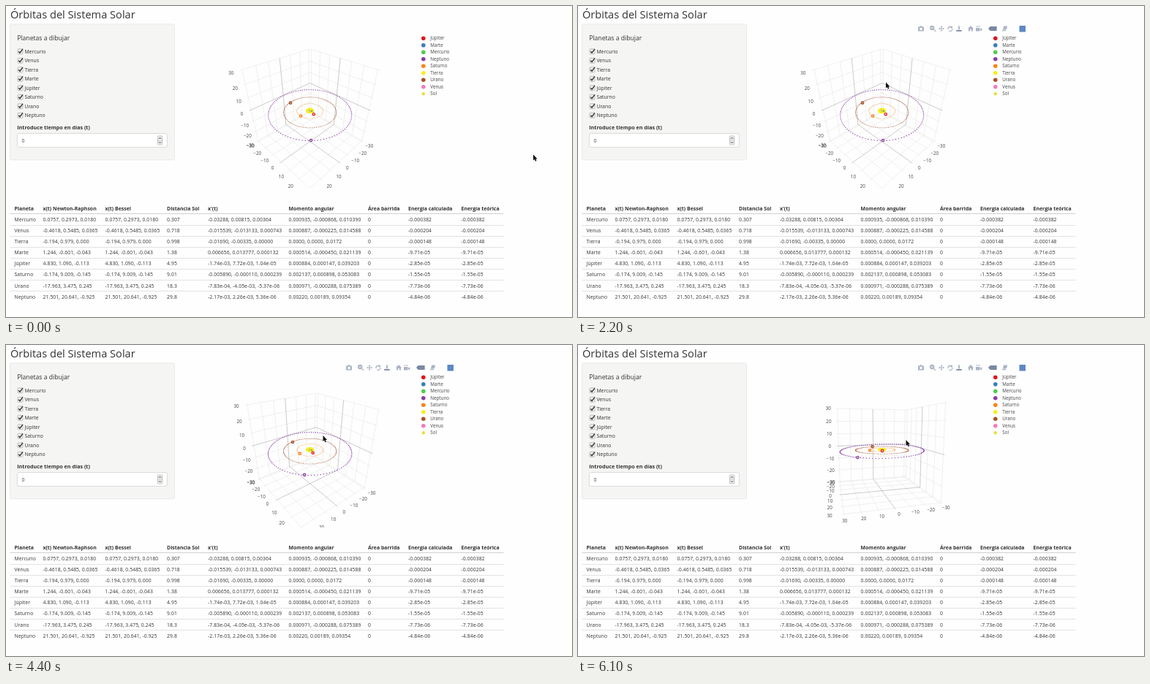
Animation of 774 by 426 pixels, one loop 6.2 s. Source, as an HTML page with a canvas:

```html
<!DOCTYPE html>
<html lang="es">
<head>
<meta charset="utf-8">
<title>Órbitas del Sistema Solar</title>
<style>
html, body { margin: 0; width: 100%; height: 100%; overflow: hidden; background: #fff; }
canvas { display: block; }
</style>
</head>
<body>
<canvas id="stage" width="774" height="426"></canvas>
<script>
const ctx = document.getElementById('stage').getContext('2d');
const LOOP = 6200, STEP = 100;
const FONT = '"Open Sans", sans-serif';
const colors = {
  'Júpiter': '#e0141c', Marte: '#377eb8', Mercurio: '#50cc4c', Neptuno: '#8a3ca5', Saturno: '#f98412',
  Tierra: '#f8ee1c', Urano: '#a6522a', Venus: '#f27bbd', Sol: '#ecdc46'
};
const planets = ['Mercurio', 'Venus', 'Tierra', 'Marte', 'Júpiter', 'Saturno', 'Urano', 'Neptuno'];
const columns = [11.5, 50.5, 135.5, 220, 276, 386.5, 495, 550, 622.5];
const heads = ['Planeta', 'x(t) Newton-Raphson', 'x(t) Bessel', 'Distancia Sol', "x'(t)", 'Momento angular',
  'Área barrida', 'Energía calculada', 'Energía teórica'];
// position | distance | velocity | angular momentum | energy
const rows = `0.0757, 0.2973, 0.0180|0.307|-0.03288, 0.00815, 0.00364|0.000935, -0.000868, 0.010390|-0.000382
-0.4618, 0.5485, 0.0365|0.718|-0.015539, -0.013133, 0.000743|0.000887, -0.000225, 0.014588|-0.000204
-0.194, 0.979, 0.000|0.998|-0.01690, -0.00335, 0.00000|0.0000, 0.0000, 0.0172|-0.000148
1.244, -0.601, -0.043|1.38|0.006656, 0.013777, 0.000132|0.000514, -0.000450, 0.021139|-9.71e-05
4.830, 1.090, -0.113|4.95|-1.74e-03, 7.72e-03, 1.04e-05|0.000884, 0.000147, 0.039203|-2.85e-05
-0.174, 9.009, -0.145|9.01|-0.005890, -0.000110, 0.000239|0.002137, 0.000898, 0.053083|-1.55e-05
-17.963, 3.475, 0.245|18.3|-7.83e-04, -4.05e-03, -5.37e-06|0.000971, -0.000288, 0.075389|-7.73e-06
21.501, 20.641, -0.925|29.8|-2.17e-03, 2.26e-03, 5.36e-06|0.00220, 0.00189, 0.09354|-4.84e-06`
  .split('\n').map(line => line.split('|'));

// Keyframes: time, then values
const cursorKeys = [[0, 721, 203.5], [350, 721, 203.5], [800, 536, 175.5], [1300, 470, 138], [1800, 421, 104.5],
  [2400, 421, 104.5], [2900, 443, 130], [3300, 443.5, 130], [4000, 441.5, 132], [4200, 441.5, 132],
  [4900, 413.5, 104], [5300, 409, 100], [5500, 409, 100], [6000, 448.5, 130]];
const cameraKeys = [[0, 45, 35.26], [4200, 45, 35.26], [4900, 71.3, 11.8], [5300, 75.3, 8]];

function at(keys, t) {
  const i = keys.findIndex(k => k[0] > t);
  if (i < 0) return keys[keys.length - 1].slice(1);
  const a = keys[i - 1], b = keys[i], u = (t - a[0]) / (b[0] - a[0]);
  return a.slice(1).map((v, j) => v + (b[j + 1] - v) * u);
}

function text(s, x, y, size, { color = '#333', weight = 400, align = 'left', spacing = 0 } = {}) {
  ctx.font = `${weight} ${size}px ${FONT}`;
  ctx.letterSpacing = spacing + 'px';
  ctx.fillStyle = color;
  ctx.textAlign = align;
  ctx.fillText(s, x, y);
}
function box(x, y, w, h, fill, stroke, r = 2) {
  ctx.beginPath();
  ctx.roundRect(x, y, w, h, r);
  ctx.fillStyle = fill;
  ctx.fill();
  if (stroke) { ctx.strokeStyle = stroke; ctx.lineWidth = .7; ctx.stroke(); }
}
function dot(x, y, r, fill, stroke) {
  ctx.beginPath();
  ctx.arc(x, y, r, 0, 7);
  ctx.fillStyle = fill;
  ctx.fill();
  if (stroke) { ctx.strokeStyle = stroke; ctx.lineWidth = 1.2; ctx.stroke(); }
}
function line(points, color, width = .6) {
  ctx.beginPath();
  points.forEach(p => ctx.lineTo(...p));
  ctx.strokeStyle = color;
  ctx.lineWidth = width;
  ctx.stroke();
}
const rule = (y, color) => line([[5.5, Math.floor(y) + .5], [680.5, Math.floor(y) + .5]], color, 1);

function drawPanel() {
  text('Órbitas del Sistema Solar', 6, 17, 14.6);
  box(5.5, 24.8, 225, 186, '#f5f5f4', '#e3e3e3');
  text('Planetas a dibujar', 15.2, 47.3, 8.65);
  planets.forEach((name, i) => {
    const y = 62.2 + i * 12.5;
    box(16, y - 3.4, 7, 7, '#eee', '#aaa', 1.2);
    line([[17.2, y], [19, y + 2], [23, y - 3.4]], '#333', 1.4);
    text(name, 25.4, y + 2.4, 6.9);
  });
  text('Introduce tiempo en días (t)', 15.2, 169.3, 7.2, { weight: 700 });
  box(15.4, 174.6, 205, 18.8, '#fff', '#ccc');
  text('0', 21.5, 186.6, 6.9, { color: '#444' });
  box(207.5, 178, 6.3, 12, '#f3f3f3', '#aaa', 1);
  line([[207.5, 184], [213.8, 184]], '#aaa');
  for (const d of [-1, 1]) line([[209, 184 + d * 2], [210.6, 184 + d * 4], [212.2, 184 + d * 2]], '#444', .9);
}

function drawTable() {
  heads.forEach((h, i) => text(h, columns[i], 279.7, 6.95, { weight: 700 }));
  rule(284, '#d0d0d0');
  rows.forEach(([pos, dist, vel, mom, energy], r) => {
    const y = 295.2 + r * 15.05;
    [planets[r], pos, pos, dist, vel, mom, '0', energy, energy].forEach((s, i) =>
      text(s, columns[i], y, 6.8, { spacing: .1 }));
    if (r < 7) rule(y + 5, '#e2e2e2');
  });
}

function drawLegend() {
  Object.keys(colors).forEach((name, i) => {
    const y = 44.2 + i * 9.5;
    dot(570.8, y, name === 'Sol' ? 2.2 : 2.8, colors[name]);
    text(name, 580.3, y + 2.2, 6.25, { color: '#444' });
  });
}

// Icons are centred on 0,0: x, path, strong
const icons = [
  [469, 'M-4-2.5h2l1-1.3h2l1 1.3h2v6h-8zM-1.8.4a1.8 1.8 0 1 0 3.6 0a1.8 1.8 0 1 0-3.6 0z'],
  [485, 'M-4-1a3.2 3.2 0 1 0 6.4 0a3.2 3.2 0 1 0-6.4 0zM-2.4-1.4h3.2v.9h-3.2zM1.3 2l1-1 2.2 2.2-1 1z'],
  [497, 'M0-4l1.6 1.8H.5v1.7h1.7v-1.1L4 0 2.2 1.6V.5H.5v1.7h1.1L0 4l-1.6-1.8h1.1V.5h-1.7v1.1L-4 0l1.8-1.6v1.1h1.7v-1.7h-1.1z'],
  [509, 'M-3.5 1a3.5 3.5 0 0 1 5-4l1-1 .8 3.4-3.3-.4 .7-.8a2.3 2.3 0 0 0-3 2.8zM3.5 0a3.5 3.5 0 0 1-5.5 3.4l.7-1a2.3 2.3 0 0 0 3.6-2.4z'],
  [521, 'M-.6-4h1.2v5.5h-1.2zM-1.7-2.5h3.4L0-4.4zM-3.8 2h7.6v1.7h-7.6z', true],
  [537, 'M0-4L4 0H3v3.5H1V1h-2v2.5h-2V0h-1z'],
  [548, 'M-4-1h5.5v4.6H-4zM2 .5l2.4-1.3v4L2 2.2zM-3.8-2.4a1.4 1.4 0 1 1 2.8 0zM-.8-2.4a1.4 1.4 0 1 1 2.8 0z'],
  [567, 'M-6 0l2.7-3h9v6h-9z', true],
  [584, 'M-3 1l1.2-4.5h5L2 1zM-3.6 1.6h5l-.4 1.7h-5z']
];
function drawModebar(alpha) {
  ctx.save();
  for (const [x, path, strong] of icons) {
    ctx.setTransform(1, 0, 0, 1, x, 31);
    ctx.globalAlpha = alpha * (strong ? .58 : .36);
    ctx.fillStyle = '#1c3260';
    ctx.fill(new Path2D(path), 'evenodd');
  }
  ctx.setTransform(1, 0, 0, 1, 0, 0);
  ctx.globalAlpha = alpha;
  box(603.5, 27, 8.5, 8.5, '#5c88c4', null, 0);
  ctx.restore();
}

// Cube of side 1 seen in perspective
const SPAN = 62.9, ZSPAN = 60, DIST = 2.165, FOCAL = 254;
function projector(azimuth, elevation) {
  const rad = Math.PI / 180;
  const ca = Math.cos(azimuth * rad), sa = Math.sin(azimuth * rad);
  const ce = Math.cos(elevation * rad), se = Math.sin(elevation * rad);
  return (x, y, z) => {
    const toward = x * ca + y * sa;
    const k = FOCAL / (DIST - toward * ce - z * se);
    return [415.7 + (y * ca - x * sa) * k, 143.4 - (z * ce - toward * se) * k];
  };
}

function drawPlot(project, hover) {
  const H = .5;
  const data = (x, y, z) => project(x / SPAN, y / SPAN, z / ZSPAN);
  const seg = (a, b, color, width) => line([project(...a), project(...b)], color, width);
  // Each coordinate value shows as one line on two of the back walls
  const wallLines = (axis, v, color, width) => {
    for (const along of [0, 1, 2]) {
      if (along === axis) continue;
      const a = [-H, -H, -H];
      a[axis] = v;
      const b = [...a];
      b[along] = H;
      seg(a, b, color, width);
    }
  };
  const label = (v, p) => {
    const [x, y] = project(...p);
    text(String(v).replace('-', '−'), x, y + 2.2, 6.25, { color: '#444', align: 'center' });
  };

  ctx.save();
  ctx.beginPath();
  ctx.rect(238, 38, 440, 212);
  ctx.clip();
  for (const zero of [false, true]) {
    for (let v = -30; v <= 30; v += 10) {
      if ((v === 0) !== zero) continue;
      [SPAN, SPAN, ZSPAN].forEach((s, axis) => wallLines(axis, v / s, zero ? '#a8a8a8' : '#e6e6e6', .6));
    }
  }
  for (let v = -30; v <= 30; v += 10) {
    label(v, [v / SPAN, .6, -H]);
    label(v, [.6, v / SPAN, -H]);
    label(v, [.594, -H, v / ZSPAN]);
  }

  const point = [-19.2452 / SPAN, 2.904576 / SPAN, -.1109735 / ZSPAN];
  if (hover) {
    point.forEach((v, axis) => {
      wallLines(axis, v, '#444', .9);
      const foot = [...point];
      foot[axis] = -H;
      seg(point, foot, '#444', .9);
    });
  }

  const orbit = (name, radius, size, tilt = 0, n = 100) => {
    for (let i = 0; i < n; i++) {
      const a = i / n * Math.PI * 2;
      dot(...data(radius * Math.cos(a), radius * Math.sin(a), -tilt * Math.cos(a - .8)), size, colors[name]);
    }
  };
  orbit('Neptuno', 30.07, .68, .93);
  orbit('Urano', 19.2, .52);
  orbit('Saturno', 9.54, .33);
  orbit('Tierra', 2, 1.7, 0, 24);
  dot(...data(0, 0, 0), 2.4, '#f2e63c');
  rows.forEach(([pos], i) => {
    const name = planets[i], [y, x, z] = pos.split(',').map(Number);
    if (i < 4) dot(...data(x, y, z), .9, colors[name]);
    else dot(...data(x, y, z), 1.7, name === 'Urano' ? '#b39a8c' : '#e8c8c4', colors[name]);
  });
  ctx.restore();

  if (hover) {
    const [x, y] = project(...point);
    line([[x, y], [x + 3, y - 2.5], [x + 3, y + 2.5], [x, y]], colors.Urano, 1);
    box(x + 2.6, y - 14, 44.4, 28, colors.Urano, null, 0);
    ['x: −19.2452', 'y: 2.904576', 'z: −0.1109735'].forEach((s, i) =>
      text(s, x + 4.4, y - 5.5 + i * 8.2, 6.4, { color: '#fff' }));
    text('Urano', x + 48.8, y - 5.7, 6.4, { color: colors.Urano });
  }
}

function drawCursor(x, y) {
  ctx.save();
  ctx.translate(x, y);
  const arrow = new Path2D('M0 0v8l1.8-1.6 1.2 2.8 1.5-.7-1.2-2.6h2.3z');
  ctx.strokeStyle = '#fff';
  ctx.lineWidth = 1;
  ctx.stroke(arrow);
  ctx.fillStyle = '#111';
  ctx.fill(arrow);
  ctx.restore();
}

function frame(now) {
  const t = Math.floor(now % LOOP / STEP) * STEP;
  ctx.fillStyle = '#fefefe';
  ctx.fillRect(0, 0, 774, 426);
  drawPanel();
  drawTable();
  drawLegend();
  drawPlot(projector(...at(cameraKeys, t)), t >= 2900 && t < 4200);
  drawModebar(Math.min(1, Math.max(0, (t - 600) / 400)));
  drawCursor(...at(cursorKeys, t));
  requestAnimationFrame(frame);
}
requestAnimationFrame(frame);
</script>
</body>
</html>
```
